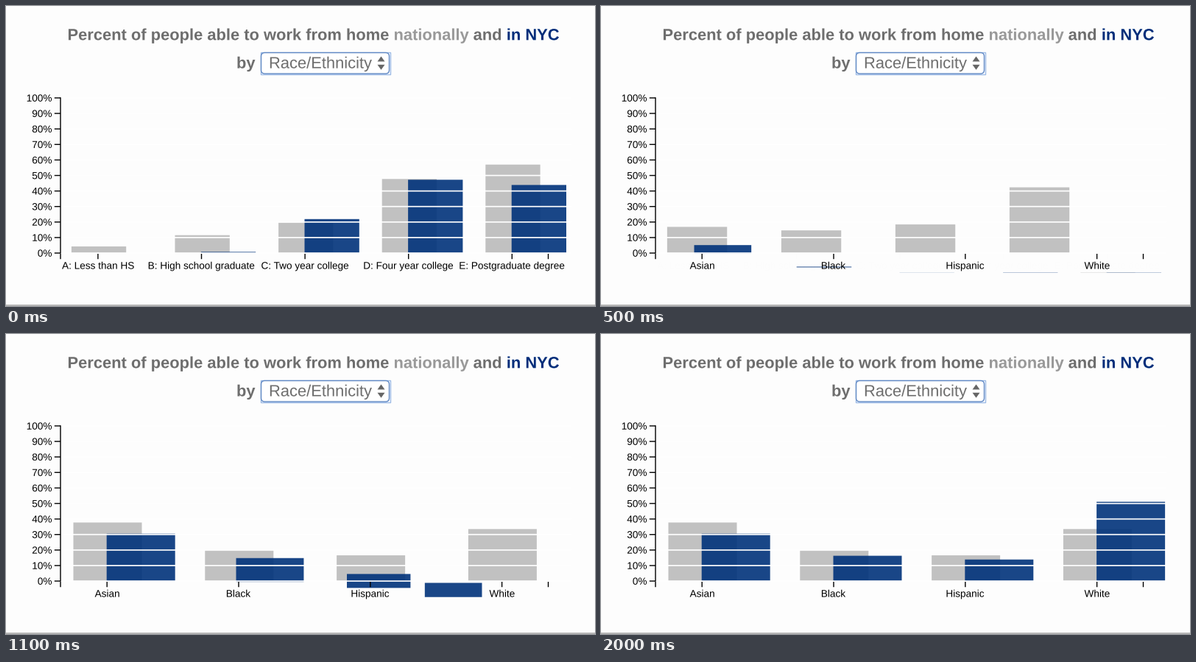
These frames come from a looping animation (800 px wide and 408 px high, 2.1 s). A matplotlib script:

```python
import matplotlib.pyplot as plt
from matplotlib.animation import FuncAnimation
from matplotlib.patches import FancyBboxPatch, PathPatch, Polygon, Rectangle
from matplotlib.textpath import TextPath
from matplotlib.transforms import Affine2D

W, H, DPI = 800, 408, 100
FRAMES, STEP = 21, 100
BASE, DECADE, SINK = 336, 21.1, 362.5
START, EXIT, MOVE = 45, 500, 1000
GREY, BLUE = "#6e6e6e", "#002d7a"

fig = plt.figure(figsize=(W / DPI, H / DPI), dpi=DPI, facecolor="#fdfdfd")
ax = fig.add_axes([0, 0, 1, 1])
ax.set(xlim=(0, W), ylim=(H, 0))
ax.axis("off")


def ease(t):
    t = min(max(t, 0), 1)
    return 4 * t**3 if t < 0.5 else 1 - 4 * (1 - t) ** 3


def lerp(a, b, p):
    return tuple(u + (v - u) * p for u, v in zip(a, b))


def text(x, y, s, size=13.6, color="black", weight="normal", align=0.0, z=6):
    prop = dict(family="Liberation Sans", weight=weight)
    path = TextPath((0, 0), s, size=size, prop=prop)
    box = path.get_extents()
    if align:
        x -= box.x0 + box.width * align
    place = Affine2D().scale(1, -1).translate(x, y) + ax.transData
    return ax.add_patch(PathPatch(path, fc=color, lw=0, transform=place, zorder=z))


def line(x0, y0, x1, y1, color="black", width=1.4, z=5):
    return ax.plot([x0, x1], [y0, y1], color=color, lw=width * 72 / DPI,
                   solid_capstyle="butt", snap=False, zorder=z)[0]


def bar(color, alpha, z):
    return ax.add_patch(Rectangle((0, 0), 0, 0, fc=color, alpha=alpha, lw=0,
                                  snap=False, zorder=z))


# Heading
SIZE = 21.9
for x, s, color in [(83.5, "Percent of people able to work from home", GREY),
                    (526.5, "nationally", "#999999"),
                    (634.6, "and", GREY),
                    (679.8, "in NYC", BLUE)]:
    text(x, 46.3, s, SIZE, color, "bold")
text(313, 84.6, "by", SIZE, GREY, "bold")

# Select box
ax.add_patch(Rectangle((345.5, 62.5), 176, 30.5, fc="white", ec="#9dbbe6",
                       lw=1.0, zorder=2))
ax.add_patch(FancyBboxPatch((346.5, 63.5), 174, 28.5, fc="white", ec="#5f88c4",
                            boxstyle="round,pad=0,rounding_size=5", lw=1.0, zorder=3))
text(357, 84.6, "Race/Ethnicity", SIZE, GREY)
for base, tip in [(75.5, 68.5), (79.8, 86.8)]:
    ax.add_patch(Polygon([(504.5, base), (514.5, base), (509.5, tip)],
                         fc="#666666", lw=0, zorder=6))

# Axes and grid
line(74, BASE - 10 * DECADE - 0.7, 74, BASE + 0.7)
for k in range(11):
    y = BASE - k * DECADE
    line(65.8, y, 74, y)
    text(62, y + 4.8, f"{10 * k}%", align=1)
    line(75, y, 768, y, "white", 1.7, 4)
for x in (74, 736.5):
    line(x, BASE + 1, x, BASE + 8.2)
line(0, 407, W, 407, "#8c8c8c", 1.2)


def category_axis(names, first, step):
    parts = []
    for i, name in enumerate(names):
        x = first + step * i
        parts += [line(x, BASE + 1, x, BASE + 8.2),
                  text(x, 357.6, name, align=0.5)]
    return parts


old_axis = category_axis(["A: Less than HS", "B: High school graduate",
                          "C: Two year college", "D: Four year college",
                          "E: Postgraduate degree"], 124.9, 140.6)
new_axis = category_axis(["Asian", "Black", "Hispanic", "White"], 137.2, 178.8)


# Bars as (x, top, width, height)
def layout(first, step, width, heights):
    return [(first + step * i, BASE - h, width, h) for i, h in enumerate(heights)]


grey_from = layout(88.9, 140.6, 74.3, [9, 24.3, 41.3, 100.7, 120.3])
grey_to = layout(91.5, 178.8, 93, [79.6, 41.6, 35, 70.7])
blue_from = layout(124.3, 140.6, 74.3, [0, 1.6, 46.2, 99.7, 92.6])
blue_to = layout(136.7, 178.8, 93, [64.4, 34.4, 29.3, 107.8])

grey_bars = [bar("#c1c1c1", 1, 2) for _ in grey_from]
blue_bars = [bar("#00327a", 0.9, 3) for _ in blue_from]


def sink(pose, ms):
    x, _, w, _ = pose
    return lerp(pose, (x, SINK, w, 0), ease((ms - START) / EXIT))


def grey_pose(i, ms):
    if i == len(grey_to):
        return sink(grey_from[i], ms)
    return lerp(grey_from[i], grey_to[i], ease((ms - START) / MOVE))


def blue_pose(i, ms):
    # each bar sinks until its own delayed rise takes over
    begin = START + 100 + 200 * i
    if i == len(blue_to) or ms < begin:
        return sink(blue_from[i], ms)
    return lerp(sink(blue_from[i], begin), blue_to[i], ease((ms - begin) / MOVE))


def draw(frame):
    ms = frame * STEP
    for bars, pose in ((grey_bars, grey_pose), (blue_bars, blue_pose)):
        for i, b in enumerate(bars):
            b.set_bounds(*pose(i, ms))
    fade = ease((ms - START) / EXIT)
    for part in old_axis:
        part.set_alpha(1 - fade)
    for part in new_axis:
        part.set_alpha(fade)
    return grey_bars + blue_bars + old_axis + new_axis


anim = FuncAnimation(fig, draw, frames=FRAMES, interval=STEP, repeat=True,
                     repeat_delay=0, blit=False)
plt.show()
```
